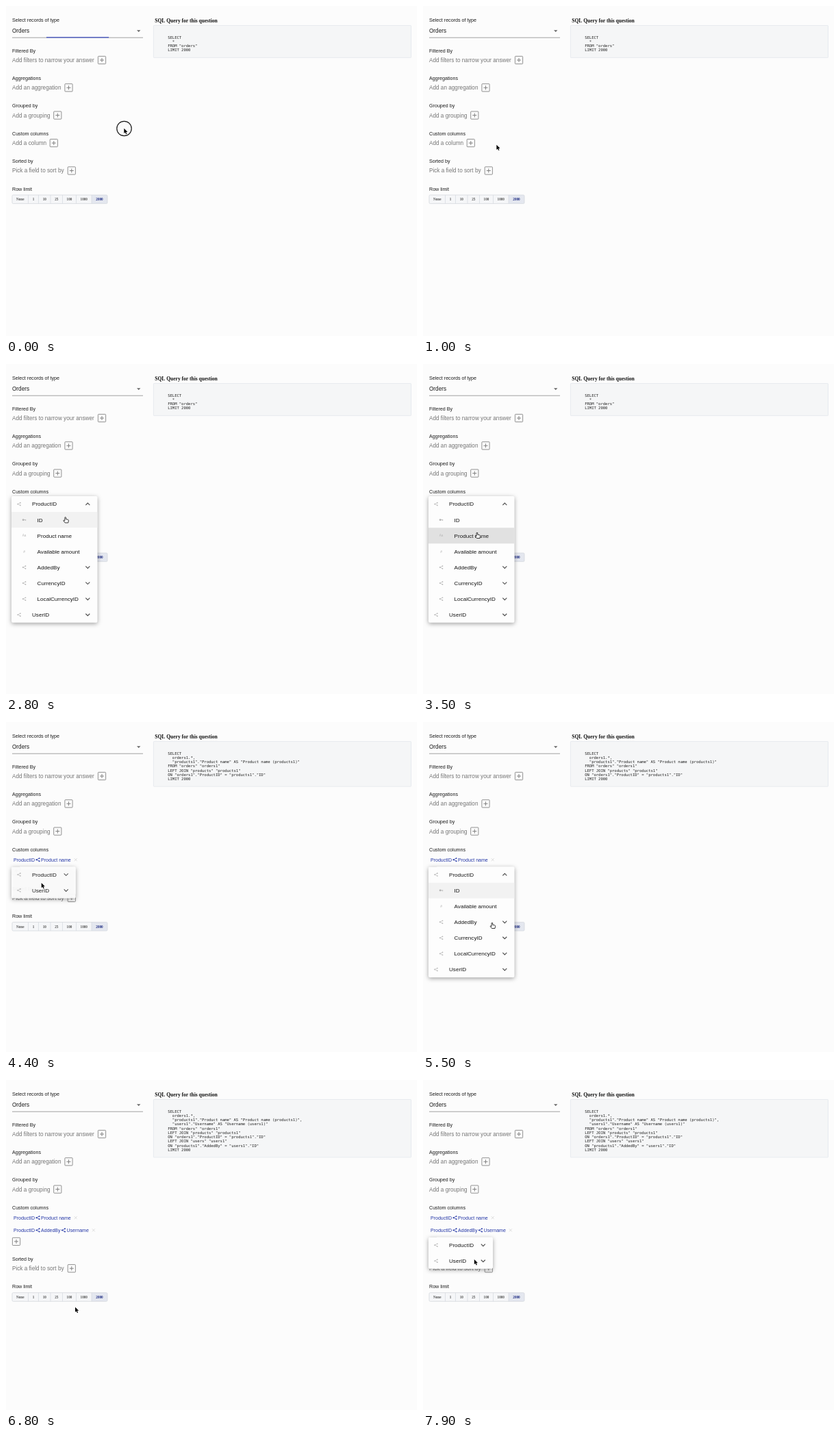
An HTML page with a canvas for the animation above (8000 ms loop, 600 by 482 pixels).

```html
<!DOCTYPE html>
<html lang="en">
<head>
<meta charset="utf-8">
<title>Query builder</title>
<style>
html, body { margin: 0; width: 100%; height: 100%; overflow: hidden; background: #fcfcfc; }
canvas { display: block; width: 600px; height: 482px; }
</style>
</head>
<body>
<canvas id="stage"></canvas>
<script>
const LOOP = 8000, W = 600, H = 482, ROW = 23.1;
const SANS = '"Liberation Sans", Arial, sans-serif';
const SERIF = '"Liberation Serif", "Times New Roman", serif';
const MONO = '"DejaVu Sans Mono", monospace';
const BLUE = '#2336a6', GREY = '#757575';

const canvas = document.getElementById('stage');
const ctx = canvas.getContext('2d');
const dpr = window.devicePixelRatio || 1;
canvas.width = W * dpr;
canvas.height = H * dpr;

const clamp = v => Math.max(0, Math.min(1, v));
const ramp = (t, start, length) => clamp((t - start) / length);
const easeOut = p => 1 - (1 - p) ** 3;
const easeInOut = p => p * p * (3 - 2 * p);

// Cursor tip: time, x, y
const PATH = [
  [0, 172.3, 178.8], [40, 172.3, 178.8], [600, 133, 204], [750, 133, 204],
  [1300, 74, 201], [1600, 69, 200], [1760, 69, 200], [1900, 56.7, 199.3],
  [2200, 84, 204], [2380, 84, 204], [2900, 87, 226], [3400, 79, 246.5],
  [3850, 79, 246.5], [4200, 16, 217], [4260, 16, 217], [4400, 51.7, 235],
  [4900, 86, 222], [5100, 86, 222], [5500, 101, 293.5], [5920, 101, 293.5],
  [6300, 101, 331.8], [6880, 101, 331.8], [7450, 16, 236], [7560, 16, 236],
  [7700, 47, 246], [7900, 74.8, 262], [8000, 74.8, 262]
];
// Hovered menu row from each time on
const HOVER = [
  [0, -1], [2220, 0], [2800, 1], [3120, 2], [3880, -1], [4660, 0],
  [5250, 1], [5530, 3], [6080, 4], [6230, 5], [6470, -1]
];
const PRESSES = [[3400, 3880], [6380, 6470]];
const PLUS_HOVER = [[1250, 1790], [4170, 4290], [7420, 7610]];
const MENUS = [
  { chips: 0, open: 1780, close: 3880, expand: 2400 },
  { chips: 1, open: 4260, close: 6460, expand: 5080, expandInner: 5930 },
  { chips: 2, open: 7590, close: 9000 }
];
const ADD_TIMES = [3880, 6460];
const CHIPS = [['ProductID', 'Product name'], ['ProductID', 'AddedBy', 'Username']];
const SHIFT = [0, 16.4, 34.7];

const JOIN_1 = ['LEFT JOIN "products" "products1"', 'ON "orders1"."ProductID" = "products1"."ID"'];
const JOIN_2 = ['LEFT JOIN "users" "users1"', 'ON "products1"."AddedBy" = "users1"."ID"'];
const NAME_COL = '  "products1"."Product name" AS "Product name (products1)"';
const SQL = [
  ['SELECT', '  *', 'FROM "orders"', 'LIMIT 2000'],
  ['SELECT', '  orders1.*,', NAME_COL, 'FROM "orders" "orders1"', ...JOIN_1, 'LIMIT 2000'],
  ['SELECT', '  orders1.*,', NAME_COL + ',', '  "users1"."Username" AS "Username (users1)"',
    'FROM "orders" "orders1"', ...JOIN_1, ...JOIN_2, 'LIMIT 2000']
];

const lastAt = (list, t) => list.reduce((v, [at, val]) => (t >= at ? val : v), list[0][1]);
const within = (spans, t) => spans.some(([a, b]) => t >= a && t < b);

function text(str, x, y, size, color = '#1c1c1c', family = SANS, weight = 400, align = 'left') {
  ctx.font = `${weight} ${size}px ${family}`;
  ctx.fillStyle = color;
  ctx.textAlign = align;
  ctx.fillText(str, x, y);
}

function line(points, color, width) {
  ctx.beginPath();
  points.forEach(([x, y], i) => (i ? ctx.lineTo(x, y) : ctx.moveTo(x, y)));
  ctx.strokeStyle = color;
  ctx.lineWidth = width;
  ctx.stroke();
}

function rect(x, y, w, h, r, fill, stroke, width = 0.8) {
  ctx.beginPath();
  ctx.roundRect(x, y, w, h, r);
  if (fill) { ctx.fillStyle = fill; ctx.fill(); }
  if (stroke) { ctx.strokeStyle = stroke; ctx.lineWidth = width; ctx.stroke(); }
}

function dot(x, y, r, color) {
  ctx.beginPath();
  ctx.arc(x, y, r, 0, 7);
  ctx.fillStyle = color;
  ctx.fill();
}

function plus(x, y) {
  rect(x - 5.6, y - 5.6, 11.2, 11.2, 0.8, null, '#858585', 0.9);
  line([[x - 3, y], [x + 3, y]], GREY, 0.9);
  line([[x, y - 3], [x, y + 3]], GREY, 0.9);
}

function shareIcon(x, y, color, s = 1) {
  line([[x + 2 * s, y - 2 * s], [x - 2 * s, y], [x + 2 * s, y + 2 * s]], color, 0.7 * s);
  [[-2, 0], [2, -2], [2, 2]].forEach(([dx, dy]) => dot(x + dx * s, y + dy * s, 0.9 * s, color));
}

function chevron(x, y, up) {
  const d = up ? -1.5 : 1.5;
  line([[x - 3, y - d], [x, y + d], [x + 3, y - d]], '#4a4a4a', 1.1);
}

function field(label, value, y, plusX) {
  text(label, 9, y + 2.6, 7.13);
  if (!value) return;
  text(value, 9, y + 16.7, 8.2, GREY);
  plus(plusX, y + 13.8);
}

function chip(parts, y) {
  let x = 11;
  parts.forEach((part, i) => {
    if (i) { shareIcon(x + 4.4, y, BLUE, 1.05); x += 9; }
    text(part, x, y + 2.6, 7, BLUE);
    x += ctx.measureText(part).width;
  });
  x += 7;
  line([[x - 2, y - 2], [x + 2, y + 2]], '#cfcfcf', 0.7);
  line([[x - 2, y + 2], [x + 2, y - 2]], '#cfcfcf', 0.7);
}

function limits(y) {
  const edges = [9, 32.5, 47.5, 65, 82.5, 102.5, 125, 148];
  rect(9, y - 6.3, 139, 12.6, 1.5, '#f5f6f8');
  rect(125, y - 6.3, 23, 12.6, [0, 1.5, 1.5, 0], '#e4e7ef');
  rect(9, y - 6.3, 139, 12.6, 1.5, null, '#d5d8de', 0.8);
  ['None', '1', '10', '25', '100', '1000', '2000'].forEach((str, i) => {
    if (i) line([[edges[i], y - 6.3], [edges[i], y + 6.3]], '#d5d8de', 0.7);
    text(str, (edges[i] + edges[i + 1]) / 2, y + 1.8, 5.2, i === 6 ? '#1c2a80' : '#555', SERIF, 700, 'center');
  });
}

function page(t, n) {
  ctx.fillStyle = '#fcfcfc';
  ctx.fillRect(0, 0, W, H);

  field('Select records of type', '', 20.2);
  text('Orders', 9, 39, 8.2);
  line([[9, 46.2], [200, 46.2]], '#8c8c8c', 0.8);
  ctx.beginPath();
  ctx.moveTo(191, 35.2);
  ctx.lineTo(196.4, 35.2);
  ctx.lineTo(193.7, 37.9);
  ctx.fillStyle = '#666';
  ctx.fill();
  const focus = 46.5 * (1 - easeOut(ramp(t, 0, 150)));
  if (focus > 0.1) line([[104.5 - focus, 45.9], [104.5 + focus, 45.9]], '#3f51c5', 1.3);

  field('Filtered By', 'Add filters to narrow your answer', 65.2, 140);
  field('Aggregations', 'Add an aggregation', 105.5, 91.5);
  field('Grouped by', 'Add a grouping', 145.8, 75.3);
  field('Custom columns', n ? '' : 'Add a column', 186.3, 69.8);
  CHIPS.slice(0, n).forEach((parts, i) => chip(parts, 201.2 + i * 18.2));
  if (n) plus(15, 199.3 + n * 18.3);
  const dy = SHIFT[n];
  field('Sorted by', 'Pick a field to sort by', 226.7 + dy, 95.8);
  field('Row limit', '', 267.1 + dy);
  limits(282.3 + dy);

  text('SQL Query for this question', 217.3, 23.7, 7.52, '#111', SERIF, 700);
  rect(215.4, 28.5, 376, 46.9 + n * 18.8, 0.5, '#f5f6f7', '#e4e7ec', 0.8);
  SQL[n].forEach((str, i) => text(str, 236.2, 47.5 + i * 6.28, 5.53, '#222', MONO));
}

const item = (name, icon, children, open = 0) => ({ name, icon, children, open });

function menuRows(menu, t) {
  const grow = start => (start ? easeInOut(ramp(t, start, 200)) : 0);
  const users = ['ID', 'Username', 'Full name', 'Email'].map((s, i) => item(s, i ? 'text' : 'key'));
  const product = [
    item('ID', 'key'),
    ...(menu.chips ? [] : [item('Product name', 'text')]),
    item('Available amount', 'number'),
    item('AddedBy', 'share', users, grow(menu.expandInner)),
    item('CurrencyID', 'share', []),
    item('LocalCurrencyID', 'share', [])
  ];
  return [item('ProductID', 'share', product, grow(menu.expand)), item('UserID', 'share', [])];
}

const heightOf = rows => rows.reduce((h, r) => h + ROW + (r.open ? r.open * heightOf(r.children) : 0), 0);

function rowIcon(kind, x, y) {
  const c = '#b5b5b5';
  if (kind === 'share') shareIcon(x, y, c, 0.95);
  if (kind === 'text') text('Aa', x, y + 1.6, 4.6, c, SANS, 400, 'center');
  if (kind === 'number') text('#', x, y + 1.8, 5, c, SANS, 400, 'center');
  if (kind === 'key') {
    dot(x - 1.5, y, 1.4, c);
    line([[x - 1, y], [x + 2.6, y]], c, 0.9);
    line([[x + 2, y], [x + 2, y + 1.3]], c, 0.8);
  }
}

function drawRows(rows, depth, top, right, state) {
  let y = top;
  for (const row of rows) {
    const mid = y + ROW / 2;
    if (state.index++ === state.hover) {
      ctx.fillStyle = state.pressed ? '#e1e1e1' : '#f2f2f2';
      ctx.fillRect(8, y, right - 8, ROW);
    }
    rowIcon(row.icon, 19 + depth * 7.6, mid);
    text(row.name, 38 + depth * 7.6, mid + 2.9, 8.1, '#161616');
    if (row.children) chevron(right - 14.2, mid, row.open > 0);
    y += ROW;
    if (row.open) {
      const h = row.open * heightOf(row.children);
      ctx.save();
      ctx.beginPath();
      ctx.rect(8, y, right - 8, h);
      ctx.clip();
      drawRows(row.children, depth + 1, y, right, state);
      ctx.restore();
      y += h;
    }
  }
}

function drawMenu(menu, t) {
  const p = ramp(t, menu.open, 220);
  const alpha = easeOut(p) * (1 - ramp(t, menu.close, 160));
  if (alpha <= 0) return;
  const rows = menuRows(menu, t);
  const top = 193 + menu.chips * 18.3;
  const right = rows[0].open ? 133.5 : 102;
  const scale = 1 - (1 - p) ** 5;
  ctx.save();
  ctx.globalAlpha = alpha;
  ctx.translate(8, top);
  ctx.scale(0.75 + 0.25 * scale, 0.56 + 0.44 * scale);
  ctx.translate(-8, -top);
  ctx.save();
  ctx.shadowColor = 'rgba(0,0,0,0.36)';
  ctx.shadowBlur = 6 * dpr;
  ctx.shadowOffsetY = 1.8 * dpr;
  rect(8, top, right - 8, heightOf(rows), 2, '#fdfdfd');
  ctx.restore();
  drawRows(rows, 0, top, right, { index: 0, hover: lastAt(HOVER, t), pressed: within(PRESSES, t) });
  ctx.restore();
}

function cursorAt(t) {
  const i = Math.max(1, PATH.findIndex(k => k[0] >= t));
  const [t0, x0, y0] = PATH[i - 1], [t1, x1, y1] = PATH[i];
  const p = easeInOut(clamp((t - t0) / (t1 - t0)));
  return [x0 + (x1 - x0) * p, y0 + (y1 - y0) * p];
}

function drawCursor(t) {
  const [x, y] = cursorAt(t);
  if (t < 90) {
    ctx.beginPath();
    ctx.arc(172.5, 179, 10.7, 0, 7);
    ctx.strokeStyle = '#1a1a1a';
    ctx.lineWidth = 1.2;
    ctx.stroke();
  }
  ctx.save();
  ctx.translate(x, y);
  ctx.lineJoin = 'round';
  const hand = lastAt(HOVER, t) >= 0 || within(PLUS_HOVER, t);
  const shape = new Path2D(hand
    ? 'M-.9 .2Q0-.9 .8 .2V2.8L3.6 3.3Q4.8 3.6 4.6 5L4 8H-.5L-3 4.8Q-2.7 3.8-.9 5Z'
    : 'M0 0V7.2L1.7 5.7L2.9 8.4L4.1 7.9L2.9 5.2H5.2Z');
  ctx.strokeStyle = hand ? '#222' : '#fff';
  ctx.fillStyle = hand ? '#fff' : '#000';
  ctx.lineWidth = hand ? 0.9 : 1.3;
  if (hand) ctx.fill(shape);
  ctx.stroke(shape);
  if (!hand) ctx.fill(shape);
  ctx.restore();
}

function frame() {
  const t = performance.now() % LOOP;
  ctx.setTransform(dpr, 0, 0, dpr, 0, 0);
  page(t, ADD_TIMES.filter(at => t >= at).length);
  MENUS.forEach(menu => drawMenu(menu, t));
  drawCursor(t);
  requestAnimationFrame(frame);
}
frame();
</script>
</body>
</html>
```
